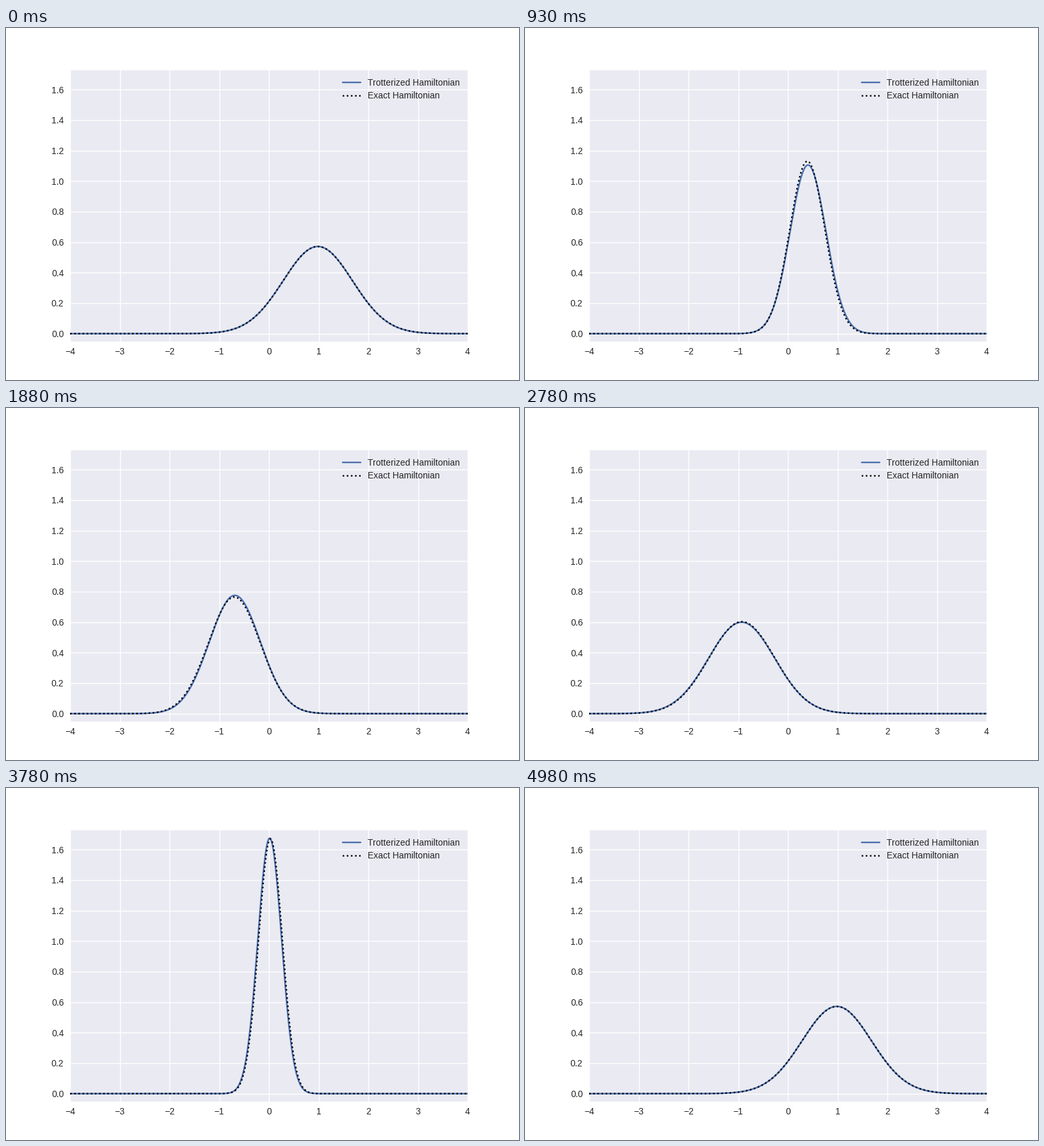
A matplotlib script for the animation above (5010 ms loop, 800 by 550 pixels).

```python
import numpy as np
import matplotlib.pyplot as plt
from matplotlib.animation import FuncAnimation

plt.rcParams.update({
    "font.family": "Liberation Sans",
    "font.size": 10,
    "text.color": ".15",
    "axes.facecolor": "#EAEAF2",
    "axes.edgecolor": "white",
    "axes.linewidth": 0,
    "axes.grid": True,
    "axes.axisbelow": True,
    "grid.color": "white",
    "grid.linestyle": "-",
    "grid.linewidth": 1,
    "lines.linewidth": 1.75,
    "lines.solid_capstyle": "round",
    "legend.frameon": False,
    "legend.fontsize": 10,
})
for tick in ("xtick", "ytick"):
    plt.rcParams.update({f"{tick}.color": ".15", f"{tick}.labelsize": 10,
                         f"{tick}.major.size": 0, f"{tick}.major.pad": 7})

STEPS = 200             # time steps in one oscillator period
STEP_MS = 25
TICK_MS = 10
LOOP_MS = 5010
OMEGA = 3
SCALE = 63 / 64         # grid spacing ratio
BLUR = 0.0028           # variance added by the grid

x = np.linspace(-4, 4, 641)


def density(theta, skew=0.0):
    """Probability density of the displaced, squeezed state at a phase."""
    c = np.cos(theta) + skew * np.sin(theta)
    s = np.sin(theta) / OMEGA
    var = SCALE**2 * 0.5 * (c**2 + s**2) + BLUR
    return np.exp(-(x - SCALE * c)**2 / (2 * var)) / np.sqrt(2 * np.pi * var)


fig, ax = plt.subplots(figsize=(8, 5.5), dpi=100, facecolor="white")
fig.subplots_adjust(left=0.125, right=0.9, bottom=0.11, top=0.88)
trotter, = ax.plot([], [], color="#4C72B0", label="Trotterized Hamiltonian")
exact, = ax.plot([], [], ":", color="black", label="Exact Hamiltonian")
ax.set_xlim(-4, 4)
ax.set_ylim(-0.05, 1.727)
legend = ax.legend(loc="upper right")

# Keep the still parts as one backdrop so each frame only draws the curves.
fig.canvas.draw()
backdrop = np.array(fig.canvas.buffer_rgba())
fig.figimage(backdrop, zorder=-1)
legend.set_visible(False)
ax.set_axis_off()


def update(i):
    step = min(i * TICK_MS // STEP_MS, STEPS - 1)
    theta = 2 * np.pi * step / STEPS
    # First-order splitting skews the orbit by half a step.
    trotter.set_data(x, density(theta, np.pi / STEPS))
    exact.set_data(x, density(theta))
    return trotter, exact


anim = FuncAnimation(fig, update, frames=LOOP_MS // TICK_MS,
                     interval=TICK_MS, repeat=True, repeat_delay=0)
plt.show()
```
